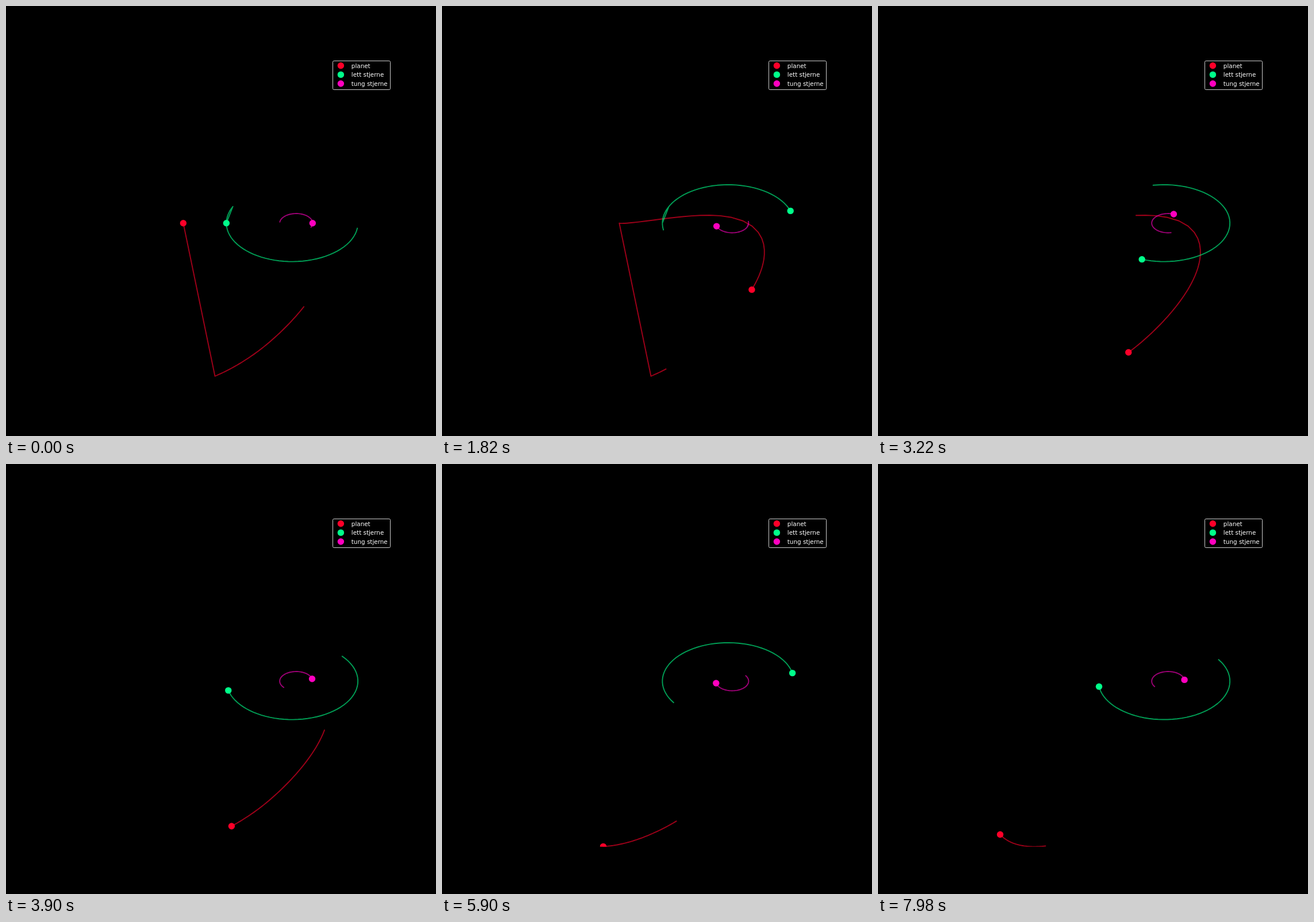
Write an HTML page with a canvas that moves like this. It is 748 by 748 pixels and loops after 8000 ms.

```html
<!DOCTYPE html>
<html lang="no">
<head>
<meta charset="utf-8">
<title>Planet og dobbeltstjerne</title>
<style>
html, body { margin: 0; width: 100%; height: 100%; overflow: hidden; background: #000; }
canvas { display: block; width: 748px; height: 748px; }
</style>
</head>
<body>
<canvas id="stage" width="748" height="748"></canvas>
<script>
const ctx = document.getElementById('stage').getContext('2d');

// Units: AU, years and solar masses.
const GM = 4 * Math.PI ** 2;
const KMS = 1 / 4.7405;
const STEP = 0.025;
const LAST = 171, TRAIL = 49, WRAP = 94;

const AXES = { x: 93.5, y: 89.76, w: 579.7, h: 575.96 };
const CX = 383.35, CY = 377.74, SX = 50, SY = 29.25;
const toPx = ([x, y]) => [CX + x * SX, CY - y * SY];
const toAu = ([x, y]) => [(x - CX) / SX, (CY - y) / SY];

// Two stars of mass 1 and 4, starting at their widest separation of 3 AU.
const ecc = 1 - (37.5 * KMS) ** 2 / (GM * 5 / 3);
const major = 3 / (1 + ecc);
const minor = major * Math.sqrt(1 - ecc * ecc);
const rate = Math.sqrt(GM * 5 / major ** 3);

function stars(t) {
  const mean = rate * t;
  let a = mean;
  for (let i = 0; i < 8; i++) a = mean - ecc * Math.sin(a);
  const dx = major * (Math.cos(a) + ecc), dy = minor * Math.sin(a);
  return [[2.4 - 0.8 * dx, 0.8 * dy], [2.4 + 0.2 * dx, -0.2 * dy]];
}

function slope(t, [x, y, vx, vy]) {
  let ax = 0, ay = 0;
  stars(t).forEach(([sx, sy], i) => {
    const dx = sx - x, dy = sy - y;
    const pull = GM * (i ? 4 : 1) / Math.hypot(dx, dy) ** 3;
    ax += pull * dx;
    ay += pull * dy;
  });
  return [vx, vy, ax, ay];
}

const add = (s, d, h) => s.map((v, i) => v + d[i] * h);

function rungeKutta(t, s, h) {
  const a = slope(t, s);
  const b = slope(t + h / 2, add(s, a, h / 2));
  const c = slope(t + h / 2, add(s, b, h / 2));
  const d = slope(t + h, add(s, c, h));
  return s.map((v, i) => v + h / 6 * (a[i] + 2 * b[i] + 2 * c[i] + d[i]));
}

function fly(pos, vel, from, to) {
  const sub = 6, h = STEP / sub;
  const states = [[...pos, ...vel]];
  let s = states[0];
  for (let k = from; k < to; k++) {
    for (let j = 0; j < sub; j++) s = rungeKutta(k * STEP + j * h, s, h);
    states.push(s);
  }
  return states;
}

// Newton search for the start velocity that reaches the goal in time.
function aim(pos, guess, from, to, goal) {
  const eps = 1e-4;
  let [vx, vy] = guess;
  const end = (x, y) => fly(pos, [x, y], from, to).pop();
  for (let i = 0; i < 8; i++) {
    const e = end(vx, vy), ex = end(vx + eps, vy), ey = end(vx, vy + eps);
    const a = (ex[0] - e[0]) / eps, b = (ey[0] - e[0]) / eps;
    const c = (ex[1] - e[1]) / eps, d = (ey[1] - e[1]) / eps;
    const mx = goal[0] - e[0], my = goal[1] - e[1];
    const det = a * d - b * c;
    vx += (d * mx - b * my) / det;
    vy += (a * my - c * mx) / det;
  }
  return [vx, vy];
}

// Waypoints of the planet: step, x, y.
const waypoints = [
  [23, 503.8, 367.8], [55, 482.5, 562.5], [83, 392.4, 630],
  [107, 326.5, 657.3], [127, 280.5, 665.4], [LAST, 212.5, 644.5]
];

function planetPath() {
  const path = [[-1.5, 0]];
  let pos = path[0], vel = [-KMS, 0], from = 0;
  for (const [to, x, y] of waypoints) {
    const states = fly(pos, aim(pos, vel, from, to, toAu([x, y])), from, to);
    path.push(...states.slice(1).map(s => s.slice(0, 2)));
    const last = states.pop();
    pos = last.slice(0, 2);
    vel = last.slice(2);
    from = to;
  }
  return path;
}

const starPaths = Array.from({ length: LAST + 1 }, (_, k) => stars(k * STEP));
const bodies = [
  { name: 'planet', color: '#ff0029', path: planetPath() },
  { name: 'lett stjerne', color: '#00ff8a', path: starPaths.map(s => s[0]) },
  { name: 'tung stjerne', color: '#ff00bf', path: starPaths.map(s => s[1]) }
];
for (const body of bodies) body.path = body.path.map(toPx);

function dot(x, y, color) {
  ctx.fillStyle = color;
  ctx.beginPath();
  ctx.arc(x, y, 5.7, 0, 2 * Math.PI);
  ctx.fill();
}

function trail({ path, color }, n) {
  ctx.strokeStyle = color;
  ctx.beginPath();
  for (let k = n - TRAIL; k <= n; k++) ctx.lineTo(...path[k < 0 ? k + WRAP : k]);
  ctx.stroke();
}

function legend() {
  ctx.strokeStyle = '#ccc';
  ctx.lineWidth = 1;
  ctx.beginPath();
  ctx.roundRect(568.5, 95.5, 100, 50, 2);
  ctx.stroke();
  ctx.font = '10.39px "DejaVu Sans", sans-serif';
  bodies.forEach(({ name, color }, i) => {
    const y = 103.8 + i * 15.6;
    dot(582.4, y, color);
    ctx.fillStyle = '#fff';
    ctx.fillText(name, 600.8, y + 3.7);
  });
}

function draw(n) {
  ctx.fillStyle = '#000';
  ctx.fillRect(0, 0, 748, 748);
  ctx.save();
  ctx.beginPath();
  ctx.rect(AXES.x, AXES.y, AXES.w, AXES.h);
  ctx.clip();
  ctx.lineWidth = 1.9;
  ctx.lineJoin = 'round';
  ctx.lineCap = 'square';
  ctx.globalAlpha = 0.62;
  for (const body of bodies) trail(body, n);
  ctx.globalAlpha = 1;
  for (const { path, color } of bodies) dot(...path[n], color);
  ctx.restore();
  legend();
}

// Steps last 20, 100 and 20 ms in turn.
function stepAt(ms) {
  const t = ms % 8000, rest = t % 140;
  return 3 * Math.floor(t / 140) + (rest < 20 ? 0 : rest < 120 ? 1 : 2);
}

function tick() {
  draw(stepAt(performance.now()));
  requestAnimationFrame(tick);
}
tick();
</script>
</body>
</html>
```
